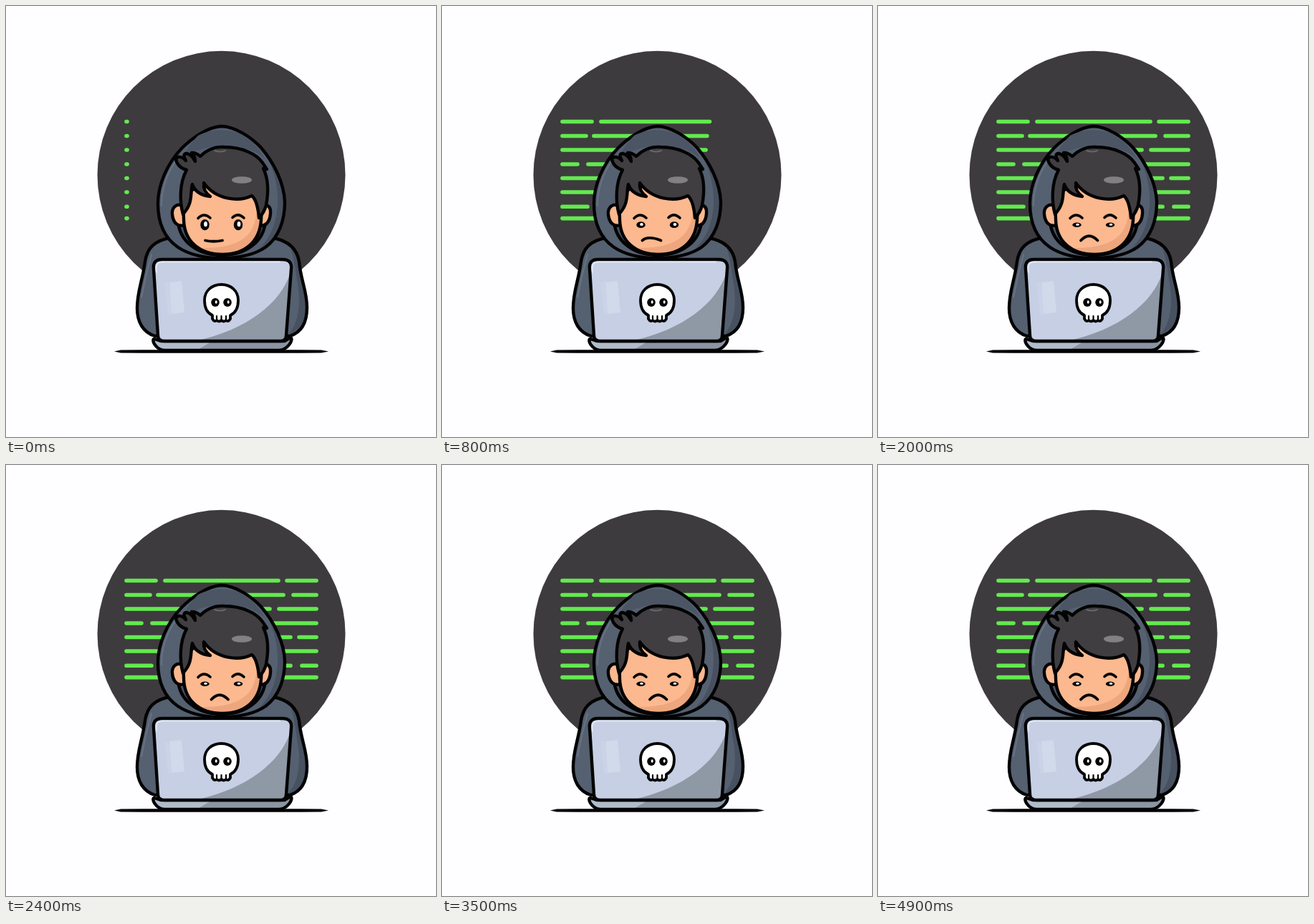
These frames come from a looping animation (600x602 px, 5000 ms). An HTML page with a canvas:

```html
<!DOCTYPE html>
<html lang="en">
<head>
<meta charset="utf-8">
<title>Coder at night</title>
<style>
html, body { margin: 0; width: 100%; height: 100%; overflow: hidden; background: #fefdff; }
canvas { display: block; }
</style>
</head>
<body>
<canvas id="stage" width="600" height="602"></canvas>
<script>
const ctx = document.getElementById('stage').getContext('2d');
const LOOP = 5000, STEP = 100;
const INK = '#030304', CLOTH = '#556070', CLOTH_DARK = '#485160', SKIN = '#fcb88e', HAIR = '#403e41';

const shape = {
  body: 'M228 324C207 328 197 338 194 357C191 382 183 398 183 422C183 441 191 456 208 461L396 461C412 456 420 442 420 421C420 398 411 382 409 357C406 339 394 328 373 324Z',
  bodyShade: 'M392 326C402 345 404 370 408 395C411 425 406 447 392 461L425 461L425 325Z',
  hood: 'M300 168C281 169 259 185 245 199C224 221 212 251 212 276C212 302 221 324 240 337C258 349 279 352 300 352C324 352 346 348 362 337C381 323 389 299 389 274C388 247 374 219 356 198C342 183 319 168 300 168Z',
  hoodShade: 'M343 181C365 204 379 237 379 270C379 305 367 333 337 352L395 352L395 181Z',
  hoodCap: 'M268 181C287 171 315 171 333 182C346 191 355 202 361 213C343 198 322 195 300 195C281 196 258 203 246 214C251 201 259 190 268 181Z',
  collar: 'M240 300C242 329 267 348 301 348C335 348 360 329 362 300Z',
  earL: 'M248 280C239 274 231 281 232 291C233 302 239 309 249 306Z',
  earR: 'M355 280C364 275 370 280 369 290C368 302 362 309 352 306Z',
  face: 'M247 263L248 299C249 329 270 347 302 347C334 347 354 329 356 299L358 258L300 238Z',
  faceShade: 'M350 285C348 320 328 338 275 338L282 350L345 350L365 310L362 275Z',
  hair: 'M237 214C239 209 246 210 251 216C247 210 248 206 252 206C257 207 261 211 264 217C264 212 262 208 259 205C265 205 269 208 271 210C281 200 293 196 305 197C329 197 350 207 358 219L364 228L359 227C367 243 366 262 363 278C361 286 357 292 353 296C352 284 350 271 343 265C325 274 293 271 276 247C275 255 278 261 285 266C273 265 263 259 260 249C258 257 259 268 256 276C254 283 250 287 247 291C242 273 242 247 252 229C244 227 238 221 237 214Z',
  base: 'M207 465C202 466 209 480 221 481L381 481C393 480 402 466 397 463L389 468L216 468Z',
  baseShade: 'M290 467L402 463L397 480L264 482Z',
  lid: 'M217 354L386 354C395 354 399 359 398 367L391 460C391 465 388 468 383 468L221 468C215 468 212 465 212 460L206 367C205 359 209 354 217 354Z',
  lidShade: 'M397 372C384 414 338 452 264 468L395 470Z',
  skull: 'M288 432C279 428 277 420 277 411C277 398 287 389 300.500 389C314 389 324 398 324 411C324 420 322 428 313 432L313 437Q310 442 307 439Q304 442 300.500 439Q297 442 294 439Q291 442 288 437Z',
  ground: 'M151 482.500L160 480.500L190 480.300L410 480.300L440 480.500L450 482.500L440 484.500L410 484.700L190 484.700L160 484.500Z'
};
for (const k in shape) shape[k] = new Path2D(shape[k]);

// Each row: y, start delay in ms, then the gaps in the line.
const rows = [
  [161.5, 12, [209, 222], [380, 392]],
  [181.5, 50, [201, 212], [387, 401]],
  [201, 0, [368, 381]],
  [221, 98, [189, 204]],
  [240.5, 0, [397, 409]],
  [260, 0],
  [280.2, 30, [203, 216], [397, 413]],
  [296.6, 0]
];

const mix = (a, b, p) => a + (b - a) * p;
const ease = x => { x = Math.min(1, Math.max(0, x)); return x * x * (3 - 2 * x); };

function fill(path, color) {
  ctx.fillStyle = color;
  ctx.fill(path);
}

function line(path, width = 4.4, color = INK) {
  ctx.strokeStyle = color;
  ctx.lineWidth = width;
  ctx.stroke(path);
}

function part(path, color, shade, shadeColor, width) {
  fill(path, color);
  if (shade) {
    ctx.save();
    ctx.clip(path);
    fill(shade, shadeColor);
    ctx.restore();
  }
  line(path, width);
}

function oval(x, y, rx, ry, color) {
  ctx.beginPath();
  ctx.ellipse(x, y, rx, ry, 0, 0, Math.PI * 2);
  ctx.fillStyle = color;
  ctx.fill();
}

function stroke(d, width, color) {
  line(new Path2D(d), width, color);
}

function drawCode(t) {
  for (const [y, delay, ...gaps] of rows) {
    const end = mix(169, 433, ease((t - delay) / (1150 - delay)));
    let x = 168;
    for (const [from, to] of [...gaps, [433, 600]]) {
      if (end > x) stroke(`M${x} ${y}H${Math.max(x + 1, Math.min(end, from))}`, 5.6, '#62ea4e');
      x = to;
    }
  }
}

function drawHood() {
  part(shape.body, CLOTH, shape.bodyShade, CLOTH_DARK);
  stroke('M203 347C198 365 193 386 189 407', 2, '#687284');
  part(shape.hood, CLOTH, shape.hoodShade, CLOTH_DARK);
  fill(shape.hoodCap, '#4b5564');
  stroke('M236 218C223 237 217 258 217 279', 2, '#687284');
  part(shape.collar, CLOTH_DARK);
}

function drawHead() {
  part(shape.earL, SKIN);
  part(shape.earR, SKIN);
  part(shape.face, SKIN, shape.faceShade, '#eda67d');
  part(shape.hair, HAIR);
  stroke('M291 202Q299 205 306 202', 2, '#68656a');
  oval(329, 243, 14, 4.8, '#818083');
}

function drawFace(t) {
  const droop = ease(t / 1200);
  const open = mix(1, 0.43, droop);
  for (const x of [277.5, 324]) {
    oval(x, 305.7, 6.2, 7.6 * open, INK);
    oval(x + 1, 305.7 - open, 2.4, 3.6 * open, '#fff');
  }
  stroke('M268 296.500Q276 288 285 296M316 295.500Q324 288 332 296', 3.6);

  const settle = ease((t - 1200) / 800);
  const shift = 7 * ease((t - 2000) / 800) - 7 * ease((t - 3500) / 1400);
  const left = mix(278, 280, droop) + 3 * settle + shift;
  const right = mix(302, 305.5, ease(t / 700)) + settle + shift;
  const peak = mix(289, 287, droop) + 7.5 * settle + shift;
  const high = mix(330, 315, ease((t - 200) / 1000));
  stroke(`M${left} 327.5Q${peak} ${high} ${right} 327.5`, 3.8);
}

function drawLaptop() {
  part(shape.base, '#b1bccb', shape.baseShade, '#8c95a3');
  part(shape.lid, '#c6cfe4', shape.lidShade, '#8f98a5');
  stroke('M210 372C208 361 212 357.500 219 357.500H382', 2, '#e2e8f4');
  fill(new Path2D('M221 387L227 386L231 430L226 431Z'), '#cad3e7');
  fill(new Path2D('M228 386L245 384L249 428L231 430Z'), '#d1daeb');
  part(shape.skull, '#fff', null, null, 3.8);
  stroke('M294 433V438M300.500 433V438M307 433V438', 2.2);
  for (const x of [292, 309]) {
    oval(x, 414, 5.8, 6, INK);
    oval(x + 1.2, 413.5, 1.5, 2.2, '#fff');
  }
  fill(shape.ground, INK);
}

function draw(now) {
  const t = Math.floor((now % LOOP) / STEP) * STEP;
  ctx.fillStyle = '#fefdff';
  ctx.fillRect(0, 0, 600, 602);
  ctx.lineCap = ctx.lineJoin = 'round';
  oval(300.5, 236, 173, 173.2, '#3e3b3e');
  drawCode(t);
  drawHood();
  drawHead();
  drawFace(t);
  drawLaptop();
}

const start = performance.now();
function tick() {
  draw(performance.now() - start);
  requestAnimationFrame(tick);
}
tick();
</script>
</body>
</html>
```
